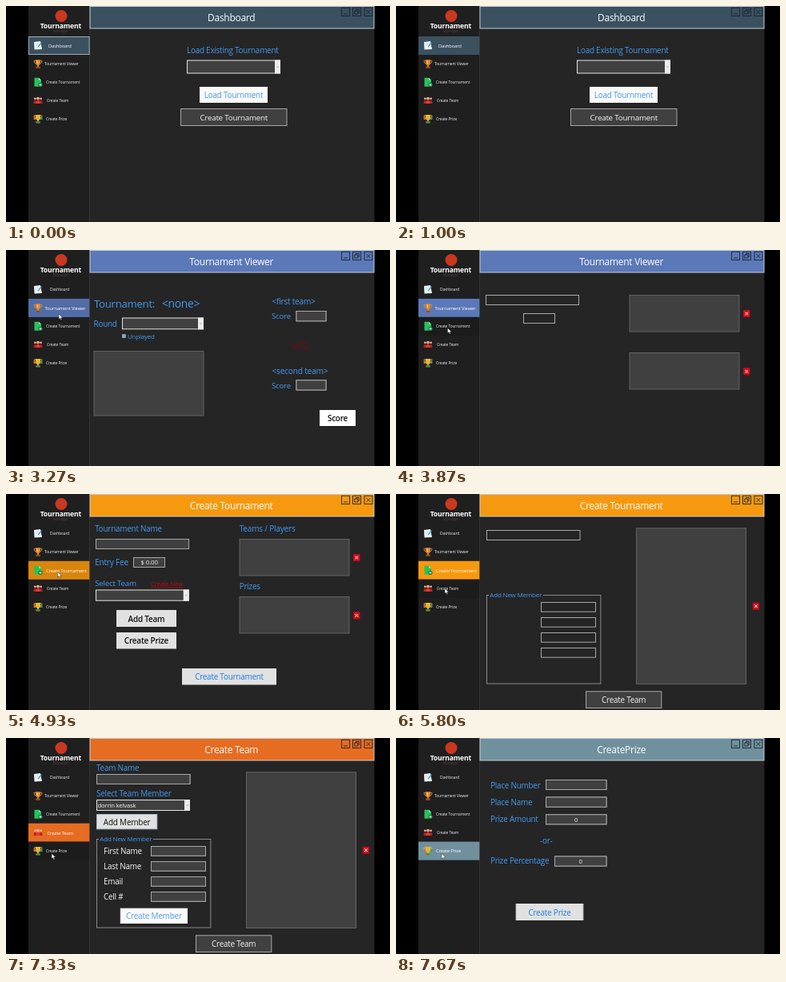
An HTML page that plays this animation: 480 by 270 pixels, repeating every 8 s.

```html
<!DOCTYPE html>
<html lang="en">
<head>
<meta charset="utf-8">
<title>Tournament dashboard</title>
<style>
html, body { margin: 0; width: 100%; height: 100%; overflow: hidden; background: #000; }
svg { display: block; width: 100vw; height: 100vh; }
text { font-family: "Open Sans", "Noto Sans", sans-serif; white-space: pre; letter-spacing: -.022em; }
</style>
</head>
<body>
<svg id="stage" viewBox="0 0 480 270"></svg>
<script>
const LOOP = 8000;
const BLUE = '#429aee', WHITE = '#f4f4f4', FIELD = '#404040', BACK = '#252526', LIGHT = '#e1e1e1';
const EDGE = '#a8a8a8', TEXT_SCALE = 1.04;
const stage = document.getElementById('stage');

function el(tag, attrs, parent) {
  const node = document.createElementNS('http://www.w3.org/2000/svg', tag);
  for (const k in attrs) node.setAttribute(k, attrs[k]);
  parent.appendChild(node);
  return node;
}
const show = (node, on) => node.setAttribute('visibility', on ? 'inherit' : 'hidden');
const box = (g, x, y, x2, y2, fill, extra) =>
  el('rect', { x, y, width: x2 - x, height: y2 - y, fill, ...extra }, g);
const framed = (g, x, y, x2, y2, fill, stroke = EDGE, w = 1) =>
  box(g, x + w / 2, y + w / 2, x2 - w / 2, y2 - w / 2, fill, { stroke, 'stroke-width': w });
const path = (g, d, fill, extra) => el('path', { d, fill, ...extra }, g);

// y is the middle of the capitals
function text(g, str, x, y, size, fill = BLUE, extra) {
  const t = el('text', { x, y: y + size * 0.36, 'font-size': size * TEXT_SCALE, fill, ...extra }, g);
  t.textContent = str;
  return t;
}
const centred = (g, str, x, y, size, fill, extra) =>
  text(g, str, x, y, size, fill, { 'text-anchor': 'middle', ...extra });

function button(g, x, y, x2, y2, str, size, fill, ink, weight = 400, edge = fill) {
  framed(g, x, y, x2, y2, fill, edge);
  centred(g, str, (x + x2) / 2, (y + y2) / 2 + 0.6, size, ink, { 'font-weight': weight });
}

function combo(g, x, y, x2, y2, str) {
  framed(g, x, y, x2, y2, FIELD, '#e4e4e4');
  box(g, x2 - 7, y, x2, y2, '#ececec');
  const m = (y + y2) / 2;
  path(g, `M${x2 - 4.8} ${m - .6}l1.3 1.3 1.3-1.3`, 'none', { stroke: '#777', 'stroke-width': .6 });
  if (str) text(g, str, x + 1.5, m, 7.4, WHITE);
}

function remove(g, x, y) {
  framed(g, x, y, x + 8.5, y + 9, '#d8101c', '#c20814');
  path(g, `M${x + 2.5} ${y + 2.7}l3.5 3.6m0-3.6l-3.5 3.6`, 'none', { stroke: '#fff', 'stroke-width': 1 });
}

// Window frame
box(stage, 0, 0, 480, 270, '#000');
box(stage, 28, 0, 104.5, 270, '#1f1f20');
box(stage, 104.5, 0, 460.5, 270, BACK);
box(stage, 104, 0, 105, 270, '#343536');
const header = framed(stage, 104.5, 0, 460.5, 28.5, '#3b5160', '#c4ccd1');
const title = centred(stage, '', 281.7, 15, 11.5, '#fff');

const chrome = el('g', { fill: 'none', stroke: '#17202a', 'stroke-width': 1, opacity: .85 }, stage);
for (const x of [419.5, 433.5, 448]) box(chrome, x, 2.3, x + 10, 12.5, 'none');
path(chrome, 'M422 9.9h5M435.8 6h4v4h-4zM437.3 6V4.5h4v4h-1.5M450.5 5l5 5m0-5l-5 5', 'none');

// Logo
el('circle', { cx: 69, cy: 12.5, r: 7.5, fill: '#c9381f' }, stage);
centred(stage, 'Tournament', 68.3, 25.3, 8.3, '#fff', { 'font-weight': 700 });
centred(stage, 'Manager', 68.5, 31, 4.7, '#4f3b39');

// Pages: "early" parts appear before the "late" ones
function page(name, color, dark, early, late) {
  const a = el('g', {}, stage), b = el('g', {}, stage);
  early(a);
  late(b);
  return { name, color, dark, a, b };
}
const input = (g, x, y, x2, y2) => framed(g, x, y, x2, y2, FIELD);
const hollow = (g, x, y, x2, y2) => framed(g, x, y, x2, y2, BACK);
const list = (g, x, y, x2, y2) => framed(g, x, y, x2, y2, FIELD, '#636363');

const tourFields = [[112, 56, 229, 69], [159, 79, 199, 92]];
const teamFields = [[113, 45, 230.5, 58],
  ...[0, 1, 2, 3].map(i => [181, 135 + i * 19, 250, 147.7 + i * 19])];
const prizeFields = [[187, 52, 263.5, 65], [187, 73.5, 263.5, 86.7], [187, 95.3, 263.5, 108.3], [198, 147.5, 263.5, 160.5]];
const viewFields = [[362.5, 76, 400.5, 89.3], [362.5, 162.3, 400.5, 175.5]];
const fill = (draw, fields) => g => fields.forEach(f => draw(g, ...f));

const pages = [
  page('Dashboard', '#3b5160', '#3b5160', g => {
    button(g, 218, 128, 351.5, 150, 'Create Tournament', 9.4, FIELD, WHITE, 400, EDGE);
  }, g => {
    text(g, 'Load Existing Tournament', 226, 55.7, 9.5);
    combo(g, 226, 67.5, 343, 84.5);
    button(g, 242, 101, 327, 121, 'Load Tournment', 9.5, '#fafafa', BLUE);
  }),

  page('Tournament Viewer', '#5b78b8', '#526ca6', g => {
    fill(hollow, viewFields)(g);
    list(g, 109.5, 126, 247.5, 207.5);
  }, g => {
    text(g, 'Tournament:', 110, 67.3, 12.7);
    text(g, '<none>', 195, 67.3, 13.3);
    text(g, 'Round', 109.5, 92.7, 9.5);
    combo(g, 145, 84.5, 247, 99.3);
    framed(g, 145, 105.3, 149.7, 110, '#7fa8cf', '#9fb5ca', .7);
    text(g, 'Unplayed', 152, 108.2, 7.6);
    text(g, '<first team>', 332.5, 64.5, 9.7);
    text(g, '<second team>', 332.5, 151, 9.8);
    text(g, 'Score', 332, 83, 9.3);
    text(g, 'Score', 332, 169.3, 9.3);
    fill(input, viewFields)(g);
    centred(g, 'V/S', 366.5, 120, 13.5, '#74090f');
    button(g, 392, 200, 437, 220, 'Score', 9.6, '#fff', '#111', 600);
  }),

  page('Create Tournament', '#f7990f', '#d9860d', g => {
    fill(hollow, tourFields)(g);
    list(g, 291.5, 56, 429.5, 102.5);
    list(g, 291.5, 128, 429.5, 174.5);
    remove(g, 434, 75);
    remove(g, 434, 147.3);
  }, g => {
    text(g, 'Tournament Name', 111.2, 44, 9.5);
    text(g, 'Entry Fee', 111.2, 85.5, 9.7);
    fill(input, tourFields)(g);
    centred(g, '$ 0.00', 179.2, 85.6, 7.6, WHITE);
    text(g, 'Select Team', 111.2, 111.7, 9.4);
    text(g, 'Create New', 181, 112.8, 7.4, '#c40812', { 'text-decoration': 'underline' });
    combo(g, 112, 119.5, 228.7, 133.7);
    button(g, 138, 145, 213, 166, 'Add Team', 9.6, LIGHT, '#111', 600);
    button(g, 138, 173, 213, 193.5, 'Create Prize', 9.6, LIGHT, '#111', 600);
    button(g, 220, 218, 338, 238.5, 'Create Tournament', 9.5, LIGHT, '#1b7fdc', 500);
    text(g, 'Teams / Players', 291.7, 44, 9.7);
    text(g, 'Prizes', 291.7, 115.2, 9.5);
  }),

  page('Create Team', '#e66c22', '#cb601f', g => {
    fill(hollow, teamFields)(g);
    framed(g, 113, 126, 256.3, 237.5, 'none', '#959595', .9);
    box(g, 116, 124, 184, 129, BACK);
    text(g, 'Add New Member', 117.3, 126.7, 7.7);
    list(g, 300, 42.3, 438, 238);
    remove(g, 445.7, 135.7);
    button(g, 237, 246.3, 332.3, 268, 'Create Team', 9.5, FIELD, WHITE, 400, EDGE);
  }, g => {
    text(g, 'Team Name', 113, 37.8, 9.5);
    text(g, 'Select Team Member', 113, 69.2, 9.6);
    fill(input, teamFields)(g);
    combo(g, 113, 77, 230, 91, 'dorrin kelvask');
    button(g, 113, 95, 189.3, 114.3, 'Add Member', 9.6, LIGHT, '#111', 500, '#a9bccf');
    ['First Name', 'Last Name', 'Email', 'Cell #'].forEach((s, i) =>
      text(g, s, 122, 142 + i * 18.8, 9.5, WHITE));
    button(g, 142.8, 212.7, 227, 232, 'Create Member', 9.6, '#fafafa', '#5a9be6');
  }),

  page('Create Prize', '#70909e', '#70909e', fill(hollow, prizeFields), g => {
    text(g, 'Place Number', 118, 60, 9.5);
    text(g, 'Place Name', 118, 81, 9.5);
    text(g, 'Prize Amount', 118, 102, 9.5);
    text(g, '-or-', 180, 129, 9.5);
    text(g, 'Prize Percentage', 118, 153.5, 9.5);
    fill(input, prizeFields)(g);
    centred(g, '0', 225.2, 102.2, 7.5, WHITE);
    centred(g, '0', 230.7, 154.3, 7.5, WHITE);
    button(g, 149.7, 207, 234.3, 228, 'Create Prize', 9.6, LIGHT, '#1b7fdc', 500);
  })
];

// Sidebar icons, drawn around 0,0
const cup = (g, color) => {
  path(g, 'M-3-5h6v3.5q0 3-2.2 3.6v1.4h1.7v1.8h-5V3.5h1.7V2.1Q-3 1.5-3-1.5z', color);
  path(g, 'M-3-4h-2q0 3.6 2.4 4M3-4h2q0 3.6-2.4 4', 'none', { stroke: color, 'stroke-width': .9 });
};
const icons = [
  g => {
    path(g, 'M-5-4.5l8-.8L5 4.6l-9.5.6z', '#eef4f7');
    path(g, 'M-.5 1.5L3.8-4.5l1.2 1-4.3 5.7z', '#3b9bd2');
    path(g, 'M-3.2-2h3.5M-3 0h2', 'none', { stroke: '#a9c4d0', 'stroke-width': .6 });
  },
  g => { cup(g, '#e0892f'); box(g, -2.5, 3.6, 2.5, 5.5, '#8a4a22'); box(g, -1.2, -4, .2, 0, '#f6c36d'); },
  g => {
    path(g, 'M-4.5-5.5h5.5l3 3v8h-8.5z', '#27c25a');
    path(g, 'M1-5.5l3 3H1z', '#9be8b4');
    el('circle', { cx: 3, cy: 3.2, r: 2.6, fill: '#16823c' }, g);
    path(g, 'M1.5 3.2h3M3 1.7v3', 'none', { stroke: '#fff', 'stroke-width': .8 });
  },
  g => {
    for (const [x, s] of [[-3.6, 1.4], [3.6, 1.4], [0, 1.9]]) {
      el('circle', { cx: x, cy: -1.6 - s / 2, r: s, fill: '#f0b088' }, g);
      path(g, `M${x - s * 1.3} 4v-2q0-2 ${s * 1.3}-2t${s * 1.3} 2v2z`, s > 1.5 ? '#e23a34' : '#b8211f');
    }
  },
  g => {
    cup(g, '#e9b23a');
    box(g, -5.4, -2, -3, 1, '#d96a2a');
    box(g, 3, -2, 5.4, 1, '#3fa556');
    box(g, -2.5, 3.2, 2.5, 5.4, '#3f8a4c');
  }
];

const rowTop = i => 38 + i * 22.9;
const nameX = [[55, 53], [48, 48.5], [50, 50], [51, 51.5], [50, 50]];
const rows = pages.map((p, i) => {
  const y = rowTop(i);
  const back = box(stage, 28, y, 104.3, y + 23, 'none');
  icons[i](el('g', { transform: `translate(40 ${y + 11.4})` }, stage));
  const small = text(stage, p.name, nameX[i][0], y + 11.6, 4.7, '#ececec');
  const large = text(stage, p.name, nameX[i][1], y + 11.8, 5.6, '#fff');
  return { back, small, large, y };
});
const focus = framed(stage, 28, 38, 104.5, 61, 'none', '#b9c3c9', .8);

const cursor = path(stage, 'M0 0v6.6l1.6-1.5 1.1 2.5 1.1-.5-1.1-2.4h2.2z', '#fff',
  { stroke: '#111', 'stroke-width': .4 });

// Page changes: when the early parts and then the full page appear
const changes = [[2400, 2530], [3800, 3930], [5740, 5870], [7470, 7600]];

// Pointer stops: start, end, x, y
const stops = [
  [0, 1870, 108, 92], [2150, 2210, 67, 68], [2340, 3270, 66, 80],
  [3540, 4930, 64.5, 97.5], [5270, 6870, 61, 118], [7070, 7270, 58, 142], [7340, LOOP, 57, 144.5]
];
function pointer(t) {
  const i = stops.findLastIndex(s => t >= s[0]);
  const a = stops[i], b = stops[i + 1];
  if (!b || t <= a[1]) return [a[2], a[3]];
  const u = (t - a[1]) / (b[0] - a[1]), k = u * u * (3 - 2 * u);
  return [a[2] + (b[2] - a[2]) * k, a[3] + (b[3] - a[3]) * k];
}

function draw(t) {
  const body = changes.filter(c => t >= c[0]).length;
  const full = changes.filter(c => t >= c[1]).length;
  const [x, y] = pointer(t);
  const visible = t >= 1870;

  pages.forEach((p, i) => {
    show(p.a, i === body);
    show(p.b, i === body && i === full);
  });
  header.setAttribute('fill', pages[full].color);
  title.textContent = full === 4 ? 'CreatePrize' : pages[full].name;

  rows.forEach((r, i) => {
    const active = i === full;
    const hover = visible && x < 104 && y >= r.y && y < r.y + 22.9;
    const { color, dark } = pages[i];
    r.back.setAttribute('fill', active ? (hover ? dark : color) : hover ? '#1c1c1d' : 'none');
    show(r.small, !active);
    show(r.large, active);
  });
  show(focus, t < 930);
  show(cursor, visible);
  cursor.setAttribute('transform', `translate(${x} ${y})`);
}

const start = performance.now();
function tick() {
  draw((performance.now() - start) % LOOP);
  requestAnimationFrame(tick);
}
tick();
</script>
</body>
</html>
```
